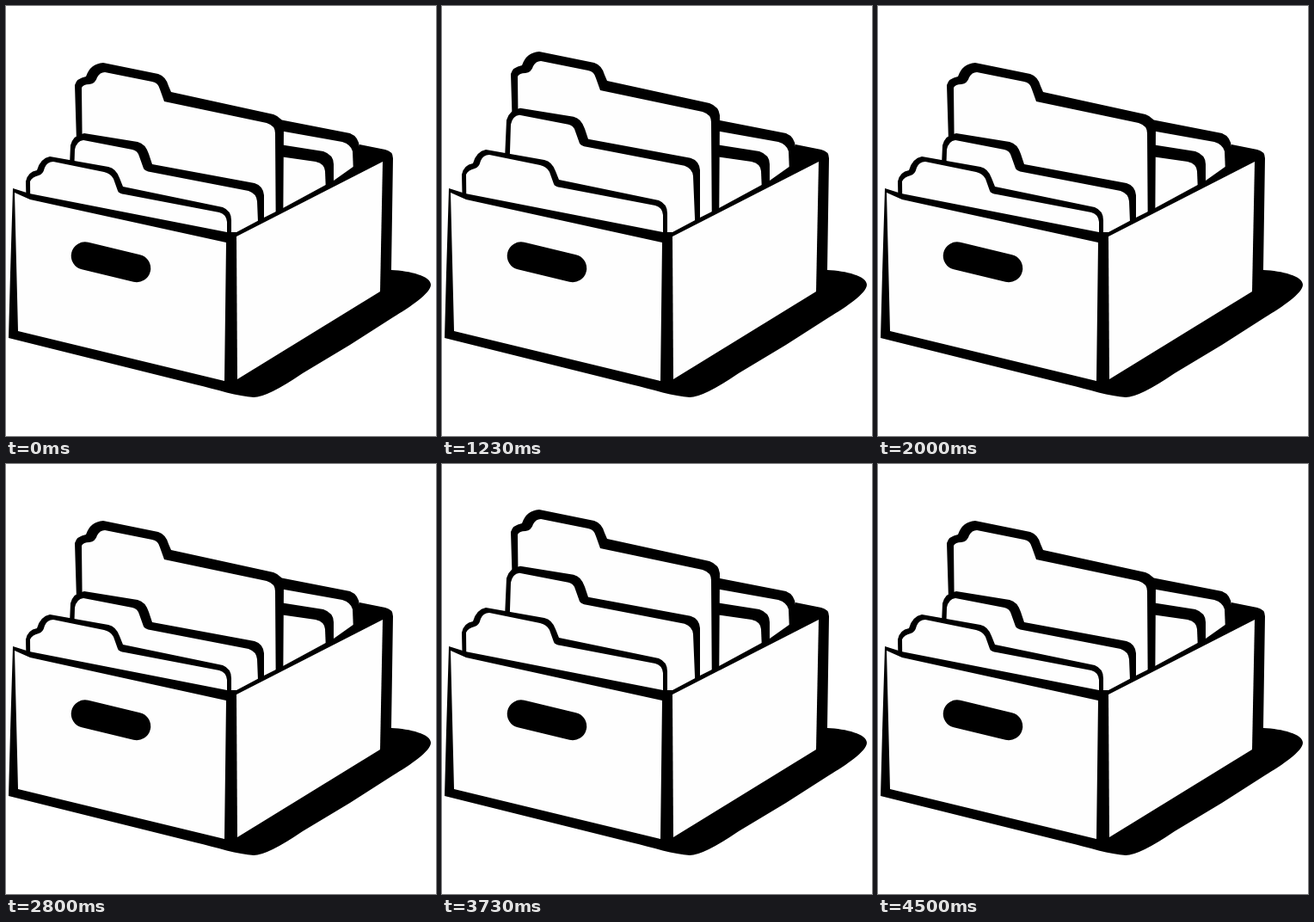
Animation of 500 by 500 pixels, one loop 5.01 s. Source, as an HTML page:

```html
<!DOCTYPE html>
<html lang="en">
<head>
<meta charset="utf-8">
<title>File box</title>
<style>
  html, body { margin: 0; width: 100%; height: 100%; overflow: hidden; background: #fff; }
  svg { display: block; width: 100%; height: 100%; }
  .paper { fill: #fefefe; }
</style>
</head>
<body>
<svg viewBox="0 0 500 500">
  <!-- two still folders at the back -->
  <path d="M318 132L400 148Q410 152 411 164V220L318 260Z"/>
  <path class="paper" d="M318 145L391 158Q401 161 403 169L405 220H318Z"/>
  <path d="M318 161L369 169Q381 173 381 184V230H318Z"/>
  <path class="paper" d="M318 175L360 181Q370 183 371 192L373 240H318Z"/>

  <g class="folder">
    <path d="M83 190L80 92Q82 84 93 82Q98 67 113 66L177 79Q186 82 189 93L192 100L311 126Q322 130 323 140L322 290H83Z"/>
    <path class="paper" d="M89 190L88 95Q90 91 97 91Q104 90 106 83Q109 77 115 77L170 88Q177 89 179 97L184 111L303 136Q313 139 313 148L314 290H89Z"/>
  </g>
  <g class="folder">
    <path d="M72 230L75 162Q78 150 91 148L153 158Q162 160 166 172L170 184L289 206Q299 209 300 220V300H72Z"/>
    <path class="paper" d="M78 230L80 167Q82 157 90 156L147 167Q153 168 155 175L160 189Q162 192 168 193L282 215Q291 218 292 227L295 300H78Z"/>
  </g>
  <g class="folder">
    <path d="M25 300L23 204Q25 193 36 191Q40 177 51 175L119 187Q128 189 132 200L136 210L252 234Q262 238 262 249V330H25Z"/>
    <path class="paper" d="M29 300L28 204Q30 199 38 197Q43 196 45 188Q48 181 55 181L114 193Q122 195 125 201L130 215Q131 218 138 219L248 240Q256 242 257 251V330H29Z"/>
  </g>

  <!-- box with its shadow -->
  <path d="M8 212L27 218L257 263H268L300 246L322 235L381 203L405 186L411 161L441 167Q450 169 450 177L448 307C470 308 494 314 494 324C494 334 470 350 450 362L400 394L345 427Q304 455 288 455C270 454 245 446 220 440L3 386L5 310Z"/>
  <path class="paper" d="M10 217L28 225L256 275L254 436L14 378Z"/>
  <path class="paper" d="M268 268L438 181L435 332L269 434Z"/>
  <path d="M92 290.500L152 305" stroke="#000" stroke-width="32.500" stroke-linecap="round"/>
</svg>
<script>
const LOOP = 5010, WAVE = 2500, HALF = 570;
const folders = document.querySelectorAll('.folder');
// back to front: height of the lift, time of its peak, sharpness
const lifts = [[18, 1430, 2], [31, 1145, 2], [43, 855, 2.5]];

function lift(t, [height, peak, power]) {
  const x = (t - peak) / HALF;
  return Math.abs(x) < 1 ? height * Math.cos(x * Math.PI / 2) ** power : 0;
}

function draw(now) {
  const t = now % LOOP;
  // the picture steps at 0 and 30 ms of every tenth of a second
  const step = Math.floor(t / 100) * 100 + (t % 100 < 30 ? 0 : 30);
  folders.forEach((folder, i) =>
    folder.setAttribute('transform', `translate(0 ${-lift(step % WAVE, lifts[i])})`));
  requestAnimationFrame(draw);
}
draw(performance.now());
</script>
</body>
</html>
```
